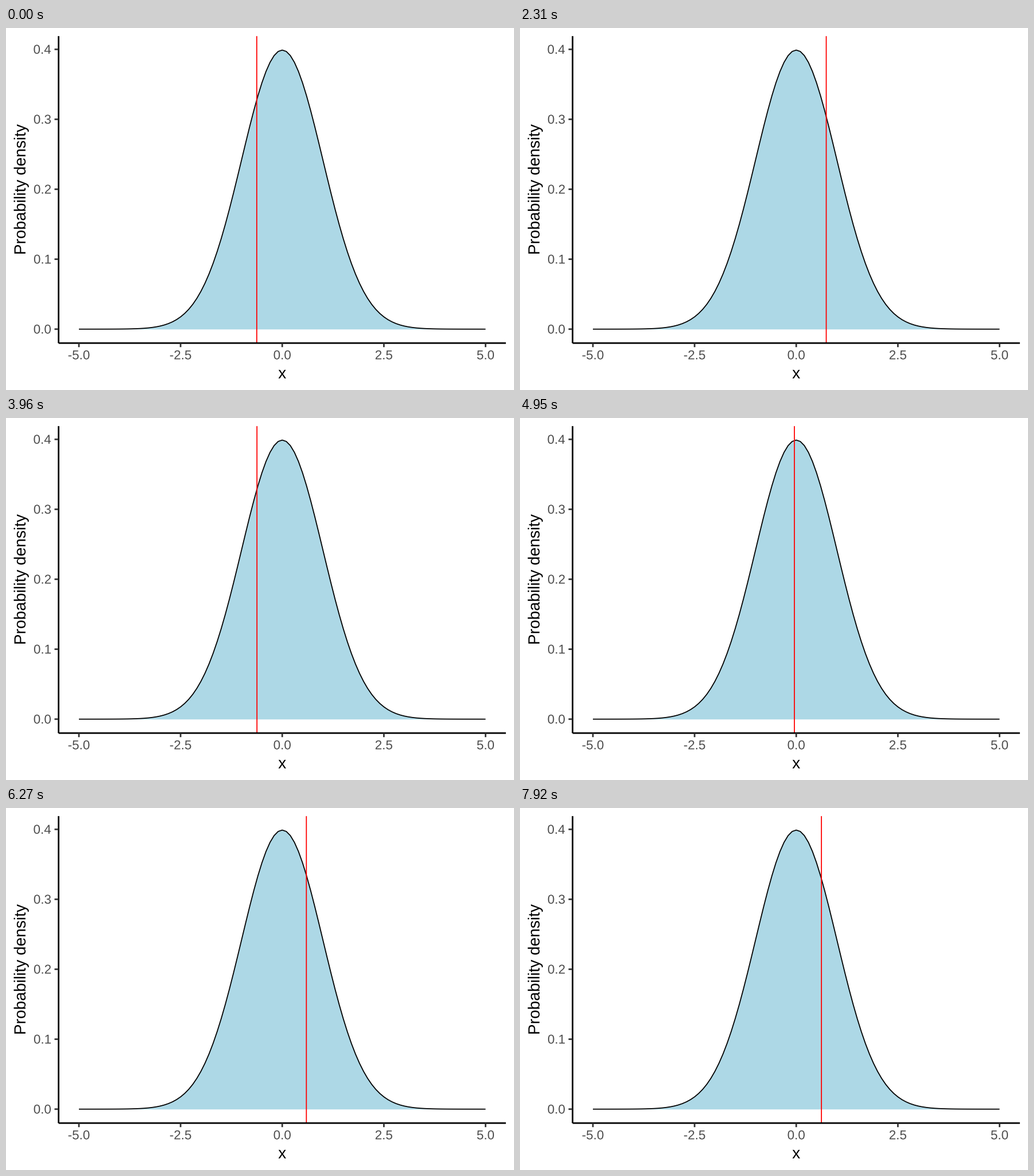
Write a matplotlib script that moves like this. It is 885 px wide and 632 px high and loops after 8.25 s.

```python
import math
import random

import matplotlib.pyplot as plt
import numpy as np
from matplotlib.animation import FuncAnimation
from matplotlib.patches import PathPatch
from matplotlib.textpath import TextPath
from matplotlib.transforms import Affine2D

W, H, DPI = 885, 632, 128
PT = 72 / DPI  # points per pixel
STEPS, STEP_MS = 25, 330

# Panel edges and type sizes in pixels
LEFT, RIGHT, TOP, BOTTOM = 91.6, 870.85, 14.17, 550.1
TITLE, LABEL = 28.1, 22.4
TICK, THIN, THICK = 7.08, 1.78, 2.75
PEAK = 1 / math.sqrt(2 * math.pi)


def density(x):
    return PEAK * np.exp(-x ** 2 / 2)


def quantile(p):
    """Inverse normal CDF by Newton's method."""
    x = 0.0
    for _ in range(40):
        x -= (0.5 * math.erfc(-x / math.sqrt(2)) - p) / density(x)
    return x


def rnorm(n, seed):
    """Normal draws as R's set.seed(seed); rnorm(n) gives them."""
    state = []
    for _ in range(50 + 625):
        seed = (69069 * seed + 1) % 2 ** 32
        state.append(seed)
    rng = random.Random()
    rng.setstate((3, tuple(state[-624:]) + (624,), None))
    big = 2 ** 27

    def unif():
        return rng.getrandbits(32) / (2 ** 32 - 1)

    return [quantile((int(big * unif()) + unif()) / big) for _ in range(n)]


def px(x):
    return LEFT + (x + 5.5) / 11 * (RIGHT - LEFT)


def py(y):
    return BOTTOM - (y / PEAK + 0.05) / 1.1 * (BOTTOM - TOP)


fig = plt.figure(figsize=(W / DPI, H / DPI), dpi=DPI, facecolor="white")
ax = fig.add_axes([0, 0, 1, 1])
ax.set(xlim=(0, W), ylim=(H, 0))
ax.axis("off")


def stroke(xs, ys, color, width, z):
    return ax.plot(xs, ys, color=color, lw=width * PT, zorder=z, snap=False,
                   solid_capstyle="butt", solid_joinstyle="round")[0]


def text(s, x, y, size, color, align="center", angle=0):
    path = TextPath((0, 0), s, size=size, prop={"family": "Liberation Sans"})
    box = path.get_extents()
    shift = box.x1 if align == "right" else (box.x0 + box.x1) / 2
    place = (Affine2D().translate(-shift, 0).scale(1, -1)
             .rotate_deg(-angle).translate(x, y))
    ax.add_patch(PathPatch(place.transform_path(path), fc=color, lw=0,
                           ec="none", zorder=6, snap=False))


# Density
grid = np.linspace(-5, 5, 101)
curve = py(density(grid))
ax.fill_between(px(grid), curve, py(0), color="#ADD8E6", lw=0, zorder=1)
stroke(px(grid), curve, "black", THIN, 2)

# Axes
stroke([LEFT, LEFT], [TOP, BOTTOM], "black", THICK, 4)
stroke([LEFT, RIGHT], [BOTTOM, BOTTOM], "black", THICK, 4)
for k in range(5):
    x, y = 2.5 * k - 5, 0.1 * k
    stroke([px(x)] * 2, [BOTTOM, BOTTOM + TICK], "#333333", THICK, 5)
    text(f"{x:.1f}", px(x), 578.4, LABEL, "#4D4D4D")
    stroke([LEFT - TICK, LEFT], [py(y)] * 2, "#333333", THICK, 5)
    text(f"{y:.1f}", 78, py(y) + 7.7, LABEL, "#4D4D4D", "right")
text("x", px(0), 611.7, TITLE, "black")
text("Probability density", 33.9, 281, TITLE, "black", angle=90)

# Sampled value
draws = rnorm(STEPS, seed=1)
marker = stroke([px(draws[0])] * 2, [TOP, BOTTOM], "#FF0000", THIN, 3)


def update(i):
    marker.set_xdata([px(draws[i])] * 2)
    return (marker,)


anim = FuncAnimation(fig, update, frames=STEPS, interval=STEP_MS,
                     repeat=True, repeat_delay=0, blit=False)
plt.show()
```
